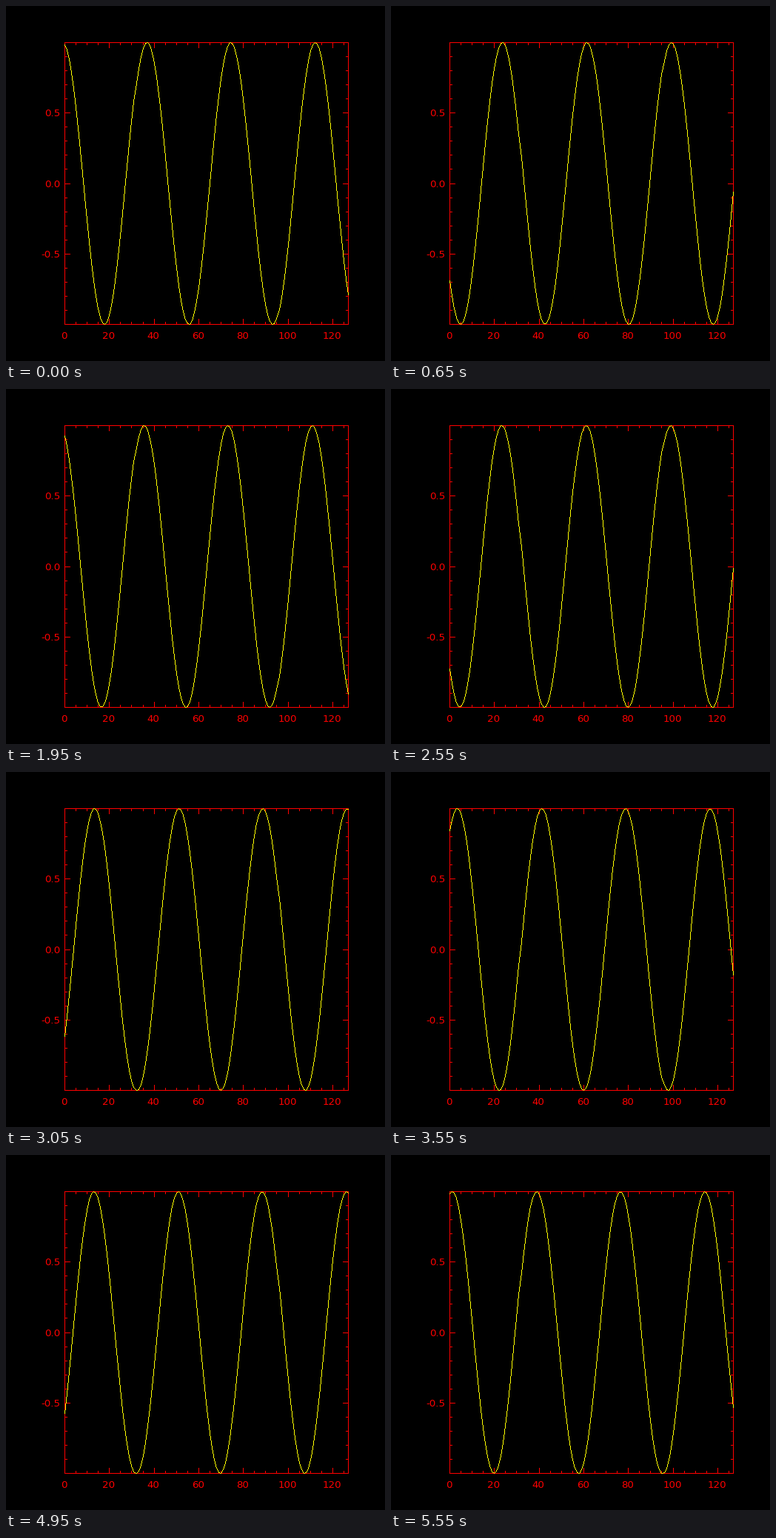
These frames come from a looping animation (512 by 480 pixels, 5.6 s). A matplotlib script:

```python
import numpy as np
import matplotlib.pyplot as plt
from matplotlib.animation import FuncAnimation

W, H, DPI = 512, 480, 64
LEFT, RIGHT, TOP, BOTTOM = 79, 462, 49, 430
MAJOR, MINOR = 8, 4
FRAMES, INTERVAL = 112, 50
RED, YELLOW = (255, 0, 0), (255, 255, 0)

plt.rcParams["font.family"] = "DejaVu Sans"

fig = plt.figure(figsize=(W / DPI, H / DPI), dpi=DPI, facecolor="black")
ax = fig.add_axes([0, 0, 1, 1])
ax.axis("off")


def to_x(v):
    return LEFT + v * (RIGHT - LEFT) / 127


def to_y(v, lo=-1.0, hi=1.0):
    return BOTTOM - (v - lo) * (BOTTOM - TOP) / (hi - lo)


def pixel(v):
    return np.floor(np.asarray(v) + 0.5).astype(int)


def polyline(canvas, xs, ys, color):
    """Draw a one-pixel line without smoothing."""
    xs, ys = pixel(xs), pixel(ys)
    for x0, y0, x1, y1 in zip(xs, ys, xs[1:], ys[1:]):
        n = max(abs(x1 - x0), abs(y1 - y0)) + 1
        canvas[pixel(np.linspace(y0, y1, n)), pixel(np.linspace(x0, x1, n))] = color


def label(x, y, text, ha):
    ax.text(x, y, text, color="#ff0000", fontsize=15, ha=ha, va="baseline")


frame = np.zeros((H, W, 3), np.uint8)
polyline(frame, [LEFT, RIGHT, RIGHT, LEFT, LEFT],
         [TOP, TOP, BOTTOM, BOTTOM, TOP], RED)

# Inward ticks on all four sides
for v in range(0, 126, 5):
    x, major = pixel(to_x(v)), v % 20 == 0
    size = MAJOR if major else MINOR
    frame[TOP:TOP + size, x] = RED
    frame[BOTTOM + 1 - size:BOTTOM + 1, x] = RED
    if major:
        label(to_x(v) - 0.5, 450, str(v), "center")

for n in range(-9, 10):
    y, major = pixel(to_y(n / 10)), n % 5 == 0
    size = MAJOR if major else MINOR
    frame[y, LEFT:LEFT + size] = RED
    frame[y, RIGHT + 1 - size:RIGHT + 1] = RED
    if major:
        label(73, y + 5, f"{n / 10:.1f}", "right")

picture = ax.imshow(frame, extent=(0, W, H, 0), interpolation="nearest",
                    aspect="auto")
t = np.arange(128)


def update(i):
    v = np.cos((t + i + 1) / 6)
    canvas = frame.copy()
    polyline(canvas, to_x(t), to_y(v, v.min(), v.max()), YELLOW)
    picture.set_data(canvas)
    return picture,


anim = FuncAnimation(fig, update, frames=FRAMES, interval=INTERVAL,
                     repeat=True, repeat_delay=0, blit=False)
plt.show()
```
